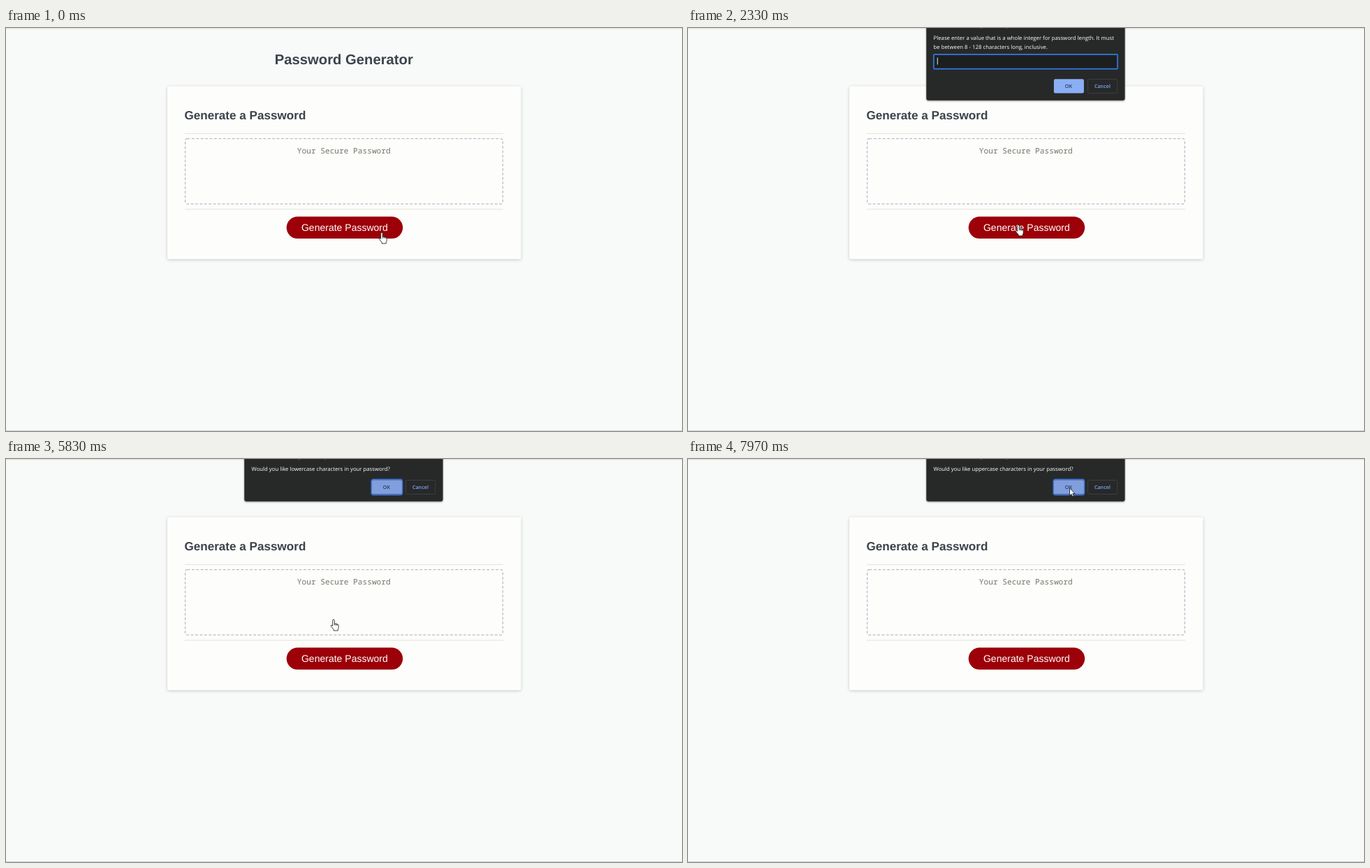
Animation of 968 by 578 pixels, one loop 8000 ms. Source, as an HTML page:

```html
<!DOCTYPE html>
<html lang="en">
<head>
<meta charset="utf-8">
<title>Password Generator</title>
<style>
  html, body { margin: 0; width: 100%; height: 100%; overflow: hidden; background: #f8faf9; }
  svg { display: block; width: 968px; height: 578px; }
  text { text-rendering: geometricPrecision; }
  .page { font-family: "Liberation Sans", Arial, sans-serif; fill: #3b434c; }
  .bold { font-weight: 700; }
  .mono { font: 11.17px "Noto Sans Mono", "DejaVu Sans Mono", monospace; fill: #76776c; }
  .mid { text-anchor: middle; }
  .card { filter: drop-shadow(0 1px 2px rgba(0, 0, 0, .2)); }
  .dialog { font: 7.78px "Open Sans", "Noto Sans", sans-serif; fill: #fff; }
  .panel { fill: #272929; filter: drop-shadow(0 1px 1.2px rgba(0, 0, 0, .45)); }
  .label { font-size: 7.2px; font-weight: 600; text-anchor: middle; }
  .cursor { fill: #fff; stroke: #111; stroke-width: .8; stroke-linejoin: round; }
</style>
</head>
<body>
<svg viewBox="0 0 968 578">
  <rect width="968" height="578" fill="#f8faf9"/>
  <rect width="968" height="1.5" fill="#e5e4dd"/>
  <rect y="577" width="968" height="1" fill="#cfd1d3"/>
  <g class="page">
    <text class="bold mid" x="483.8" y="51.8" font-size="20.25">Password Generator</text>
    <rect class="card" x="231" y="83.5" width="506.5" height="248" rx="2" fill="#fdfdfb"/>
    <text class="bold" x="255.4" y="131.4" font-size="17.12">Generate a Password</text>
    <path d="M256 151.3H712M256 260H712" stroke="#e4e3da"/>
    <rect x="256.6" y="158.6" width="454.8" height="93.8" rx="3" fill="none"
      stroke="#b9bccf" stroke-width="1.3" stroke-dasharray="3.9 2.5"/>
    <text class="mono" x="416.8" y="180.4">Your Secure Password</text>
    <rect x="401.7" y="270.5" width="166.5" height="31.6" rx="15.8" fill="#9c0008"/>
    <text class="mid" x="484.9" y="290.9" font-size="14.03" fill="#fff">Generate Password</text>
  </g>
  <g id="dialogs"></g>
  <path id="hand" class="cursor" d="M-1.3 8V0a1.3 1.3 0 0 1 2.6 0V4.4l4.4 1q1.5.4 1.5 2V10q0 1.5-.9 3v1.6H.2V13L-3.6 8.4Q-4.2 7-2.8 6.8ZM1.3 4.4V7M3.3 5V7.2M5.2 5.4V7.5"/>
  <path id="arrow" class="cursor" d="M0 0V10.6L2.5 8.3 4.1 12 5.9 11.2 4.3 7.6H7.6Z"/>
</svg>
<script>
const LOOP = 8000;
const byId = id => document.getElementById(id);
const clamp = v => Math.max(0, Math.min(1, v));

const buttons = (y, focused) => `
  ${focused ? `<rect x="523.2" y="${y - .8}" width="44.4" height="22.4" rx="3" fill="#1f2a44" stroke="#3f78e0" stroke-width="1.4"/>` : ""}
  <rect x="523.9" y="${y + .2}" width="43" height="20.4" rx="2" fill="${focused ? "#819fdf" : "#8aaff4"}"/>
  <rect x="572.5" y="${y + .5}" width="42.3" height="20" rx="2" fill="none" stroke="#3b3e43"/>
  <text class="label" x="545" y="${y + 13}" fill="#28375c">OK</text>
  <text class="label" x="593.4" y="${y + 13}" fill="#82a5f2">Cancel</text>`;

const dialog = (bottom, lines, extra, focused) => `
  <g class="dialog">
    <rect class="panel" x="341.3" y="-30" width="284.3" height="${bottom + 29.7}" rx="3"/>
    <text x="352" y="-1.6" font-size="9.5">From the local guide to your tab</text>
    ${lines.map((line, i) => `<text x="351.6" y="${16.7 + i * 12.8}">${line}</text>`).join("")}
    ${extra}${buttons(bottom - 31, focused)}
  </g>`;

const field = `
  <rect id="field" x="351.9" y="37.9" width="263.2" height="20.7" rx="1" fill="#1d1f1f" stroke-width="1.7"/>
  <text id="typed" x="356.4" y="51"></text>
  <rect id="caret" y="42.5" width=".9" height="10"/>`;

const ask = kind => dialog(61, [`Would you like ${kind} characters in your password?`], "", true);

byId("dialogs").innerHTML =
  dialog(104, ["Please enter a value that is a whole integer for password length. It must",
    "be between 8 - 128 characters long, inclusive."], field, false) +
  ask("lowercase") + ask("uppercase");

// Start of opening and of closing for each dialog
const spans = [[2090, 5210], [5150, 7190], [7130, Infinity]];
const panels = [...byId("dialogs").children];

// Cursor hotspot: time, x, y
const path = [
  [0, 538, 294.5], [1000, 534, 294], [1430, 517, 291.5], [1850, 473, 283.5],
  [2650, 473, 283.5], [3150, 469, 231.5], [5900, 469, 231.5], [6500, 550, 36],
  [6950, 550, 36], [7400, 546.5, 42], [LOOP, 546.5, 42]
];

function cursorAt(t) {
  const i = path.findIndex(p => p[0] > t);
  const [t0, x0, y0] = path[i - 1], [t1, x1, y1] = path[i];
  const k = (t - t0) / (t1 - t0);
  return [x0 + (x1 - x0) * k, y0 + (y1 - y0) * k];
}

function drawDialogs(t) {
  panels.forEach((panel, i) => {
    const shown = clamp((t - spans[i][0]) / 150);
    const gone = clamp((t - spans[i][1]) / 170);
    const scale = 1 + gone * .03;
    const y = -30 * (1 - shown) - 18 * gone;
    panel.style.display = shown > 0 && gone < 1 ? "" : "none";
    panel.style.opacity = shown * (1 - gone);
    panel.setAttribute("transform", `translate(${483.5 * (1 - scale)} ${y}) scale(${scale})`);
  });
}

function drawField(t) {
  const count = (t >= 4650) + (t >= 4830);
  const since = t - [2090, 4650, 4830][count];
  const focused = t < spans[1][0];
  byId("field").setAttribute("stroke", focused ? "#3279e2" : "none");
  byId("typed").textContent = "10".slice(0, count);
  byId("caret").setAttribute("x", 356.8 + count * 4.45);
  byId("caret").style.display = focused && since % 1000 < 500 ? "" : "none";
}

function drawCursor(t) {
  const [x, y] = cursorAt(t);
  const onDialog = y < 61;
  for (const id of ["hand", "arrow"]) {
    const el = byId(id);
    el.style.display = (id === "arrow") === onDialog ? "" : "none";
    el.setAttribute("transform", `translate(${x} ${y})`);
  }
}

const start = performance.now();
function frame() {
  const t = (performance.now() - start) % LOOP;
  drawDialogs(t);
  drawField(t);
  drawCursor(t);
  requestAnimationFrame(frame);
}
frame();
</script>
</body>
</html>
```
